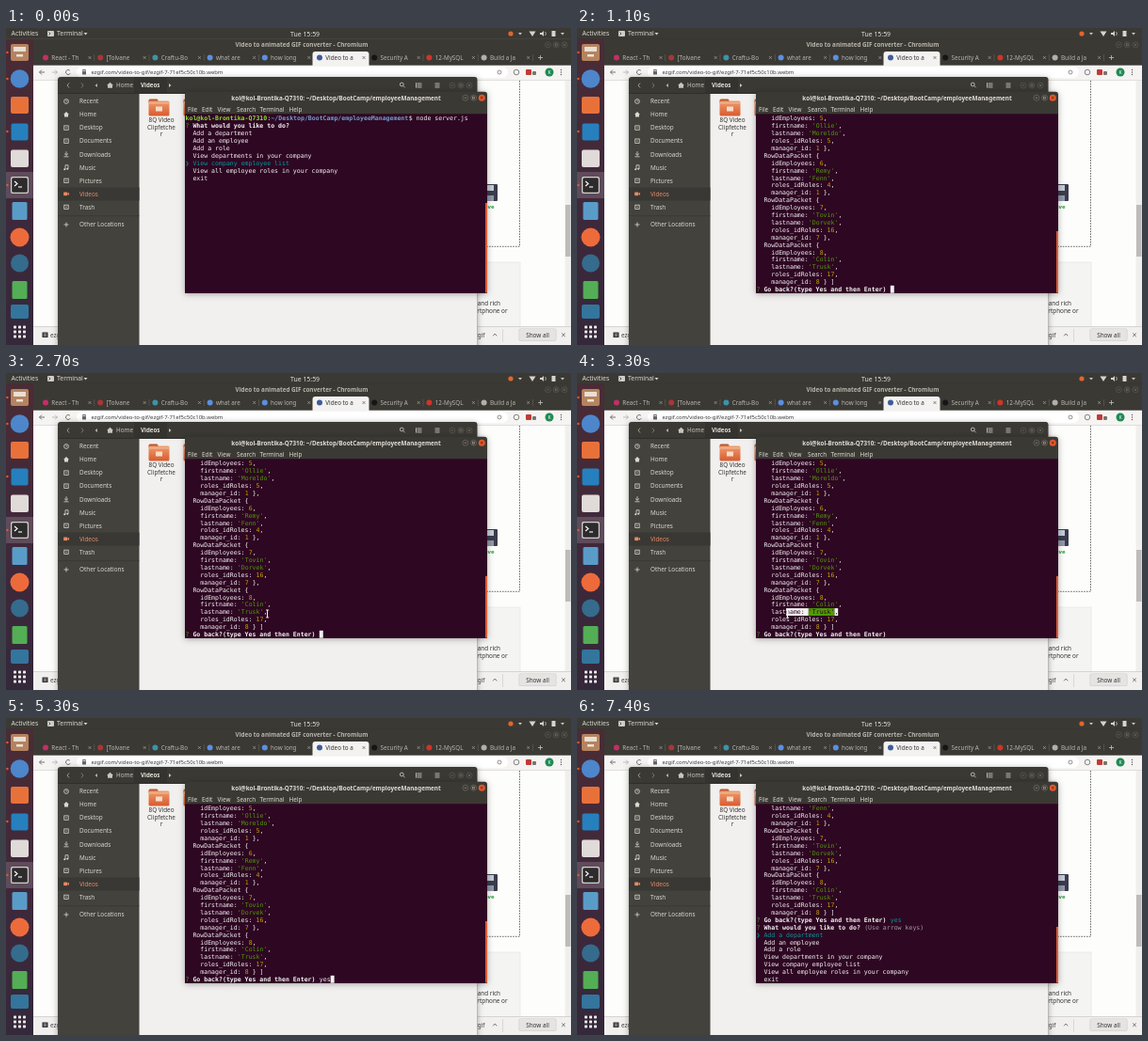
Write an HTML page with a canvas that moves like this. It is 600 px wide and 337 px high and loops after 7.5 s.

```html
<!DOCTYPE html>
<html lang="en">
<head>
<meta charset="utf-8">
<title>Desktop terminal session</title>
<style>
html, body { margin: 0; width: 100%; height: 100%; overflow: hidden; background: #fff; }
canvas { display: block; width: 600px; height: 337px; }
</style>
</head>
<body>
<canvas id="stage" width="600" height="337"></canvas>
<script>
const W = 600, H = 337, LOOP = 7500;
const UI = '"Noto Sans", "Open Sans", sans-serif';
const MONO = '"DejaVu Sans Mono", monospace';
const stage = document.getElementById('stage').getContext('2d');
const desk = document.createElement('canvas');
desk.width = W;
desk.height = H;
let c = desk.getContext('2d');

// ---------- drawing helpers ----------
function rect(x, y, w, h, color) {
  c.fillStyle = color;
  c.fillRect(x, y, w, h);
}
function round(x, y, w, h, r, color) {
  c.fillStyle = color;
  c.beginPath();
  c.roundRect(x, y, w, h, r);
  c.fill();
}
function disc(x, y, r, color) {
  c.fillStyle = color;
  c.beginPath();
  c.arc(x, y, r, 0, Math.PI * 2);
  c.fill();
}
function ring(x, y, r, color, width = 0.8) {
  c.beginPath();
  c.arc(x, y, r, 0, Math.PI * 2);
  c.strokeStyle = color;
  c.lineWidth = width;
  c.stroke();
}
function path(points, color, width = 0.8, closed = false) {
  c.beginPath();
  points.forEach(([x, y], i) => i ? c.lineTo(x, y) : c.moveTo(x, y));
  if (closed) c.closePath();
  c.strokeStyle = color;
  c.lineWidth = width;
  c.stroke();
}
function poly(points, color) {
  c.beginPath();
  points.forEach(([x, y]) => c.lineTo(x, y));
  c.closePath();
  c.fillStyle = color;
  c.fill();
}
function label(str, x, y, color, size = 6.35, weight = 400, align = 'left') {
  c.font = `${weight} ${size}px ${UI}`;
  c.textAlign = align;
  c.fillStyle = color;
  c.fillText(str, x, y);
}
function cross(x, y, r, color, width) {
  path([[x - r, y - r], [x + r, y + r]], color, width);
  path([[x + r, y - r], [x - r, y + r]], color, width);
}
function caret(x, y, color) {
  poly([[x - 2, y - 1], [x + 2, y - 1], [x, y + 1.4]], color);
}
function chevron(x, y, dir, color) {
  path([[x - dir, y - 2.5], [x + dir, y], [x - dir, y + 2.5]], color);
}
function shadow(on) {
  c.shadowColor = on ? 'rgba(0,0,0,.35)' : 'transparent';
  c.shadowBlur = on ? 6 : 0;
  c.shadowOffsetY = on ? 1 : 0;
}
function windowButtons(x, y, step, active) {
  const ink = active ? '#a5a199' : '#75726b';
  for (const i of [1, 2]) ring(x - i * step, y, 3, active ? '#6b6861' : '#57554f');
  if (active) disc(x, y, 3.5, '#e2582c');
  else ring(x, y, 3, '#57554f');
  path([[x - 2 * step - 1.2, y], [x - 2 * step + 1.2, y]], ink, 0.7);
  c.strokeRect(x - step - 1, y - 1, 2, 2);
  cross(x, y, 1.2, active ? '#4a1c0c' : ink, 0.7);
}

// ---------- desktop ----------
const BAR = '#3b3934', PALE = '#d8d4cc';

function panel() {
  rect(0, 0, W, 11.5, BAR);
  label('Activities', 5.5, 8.4, '#dedad3', 6.9);
  round(44, 3, 7, 6, 1, '#d0cdc8');
  path([[45.5, 4.5], [47, 6], [45.5, 7.5]], '#222', 0.7);
  label('Terminal', 54, 8.4, '#dedad3', 6.8);
  caret(84.5, 6, PALE);
  label('Tue 15:59', 317.5, 8.5, '#e6e3de', 6.9, 500, 'center');
  disc(536, 6, 2.6, '#e0662f');
  caret(546, 6, '#c9c6c0');
  poly([[555.5, 3.5], [562.5, 3.5], [559, 9]], PALE);
  poly([[567, 5], [569, 5], [571, 3], [571, 9], [569, 7], [567, 7]], PALE);
  path([[572.5, 4], [573.5, 6], [572.5, 8]], PALE, 0.7);
  rect(579.5, 3, 4, 6, PALE);
  caret(591, 6, '#c9c6c0');
}

function dock() {
  const fade = c.createLinearGradient(0, 11, 0, H);
  fade.addColorStop(0, '#4a2c35');
  fade.addColorStop(0.5, '#3f293b');
  fade.addColorStop(1, '#34283a');
  rect(0, 11.5, 29, H, fade);
  round(5, 17, 19, 18, 2, '#b5835f');
  rect(8, 20, 13, 5, '#e8dfd4');
  rect(11, 28, 7, 2.5, '#eee3d6');
  disc(14.5, 54, 9.8, '#4d86cb');
  round(5, 73, 19, 18, 2, '#e8713a');
  round(5.5, 101.5, 18, 18, 2, '#2680bd');
  round(5, 129.5, 19, 18.5, 2, '#e0dad8');
  rect(0, 153, 29, 28, 'rgba(255,255,255,.16)');
  round(5, 158, 19, 18, 2, '#d4d1cc');
  round(6.2, 159.2, 16.6, 15.6, 1.5, '#2d2b2c');
  path([[9, 163], [12, 165.5], [9, 168]], '#fff', 1.1);
  path([[13, 169], [17, 169]], '#fff', 1.1);
  round(6.5, 185, 16, 19, 1.5, '#5a9cc8');
  disc(14.5, 222.5, 10, '#ed6b3b');
  disc(14.5, 250, 9.5, '#356b8c');
  round(6.5, 269, 16, 19, 1.5, '#53ae55');
  round(5, 294, 19, 15, 2, '#33759c');
  for (let i = 0; i < 9; i++) {
    round(8 + (i % 3) * 5, 316.5 + Math.floor(i / 3) * 5, 3, 3, 0.7, '#eeeaea');
  }
  for (const y of [26, 54, 110, 167]) disc(1.4, y, 1.2, '#e2582c');
}

const TABS = [
  ['React - Th', '#c22f66'], ['[Tolvane', '#a93636'], ['Craftu-Bo', '#3b94a8'],
  ['what are ', '#5b8fe0'], ['how long ', '#5b8fe0'], ['Video to a', '#3d5c9b'],
  ['Security A', '#151515'], ['12-MySQL', '#cf3527'], ['Build a Ja', '#b4b0a8']
];

function browser() {
  rect(29, 11.5, W - 29, 28.5, BAR);
  label('Video to animated GIF converter - Chromium', 314, 20, '#b9b5ac', 6.3, 600, 'center');
  windowButtons(593, 17.8, 8.8, false);
  TABS.forEach(([name, color], i) => {
    const x = 36 + i * 58.2, active = i === 5;
    if (active) round(x - 1.5, 25, 60, 16, [3, 3, 0, 0], '#f3f2f0');
    disc(x + 6, 31.5, 3, color);
    label(name, x + 12.3, 33.7, active ? '#333' : '#b8b5af', 6.3);
    cross(x + 53, 31.5, 1.4, active ? '#555' : '#aaa7a1', 0.7);
    if (!active && i !== 4) rect(x + 57.5, 28, 0.6, 7, '#66635e');
  });
  path([[565, 31.5], [570, 31.5]], '#c5c2bc');
  path([[567.5, 29], [567.5, 34]], '#c5c2bc');

  rect(29, 39.7, W - 29, 16, '#f5f4f2');
  path([[41, 47], [35.5, 47], [38, 44.5]], '#555');
  path([[35.5, 47], [38, 49.5]], '#555');
  path([[49, 47], [54.5, 47], [52, 44.5]], '#aaa');
  path([[54.5, 47], [52, 49.5]], '#aaa');
  c.beginPath();
  c.arc(66, 47, 2.5, 0.4, 5.6);
  c.strokeStyle = '#555';
  c.stroke();
  round(75, 41, 458, 12, 6, '#fff');
  rect(81, 46.3, 4, 3.2, '#666');
  c.strokeRect(81.8, 44.3, 2.4, 2);
  label('ezgif.com/video-to-gif/ezgif-7-71ef5c50c10b.webm', 90.5, 49.3, '#3b3b3b', 5.9);
  ring(524, 47, 2, '#777');
  ring(542, 47, 2.8, '#666');
  round(552, 44, 6, 6, 1, '#c23a34');
  round(559, 46, 4, 4, 1, '#77756f');
  disc(577, 47, 4.5, '#1f8a53');
  label('K', 577, 48.9, '#fff', 5, 400, 'center');
  for (const y of [44.5, 47, 49.5]) disc(589.5, y, 0.7, '#555');

  rect(29, 55.7, W - 29, 262, '#fdfdfc');
  rect(29, 55.4, W - 29, 0.6, '#d2d0cc');
  c.setLineDash([1.6, 1.2]);
  path([[545.5, 56], [545.5, 232.3], [498, 232.3]], '#444', 0.8);
  c.setLineDash([]);
  round(505, 166, 17, 18, 1, '#3a3c4c');
  rect(509, 167, 9, 6, '#c5cbd8');
  rect(509, 178, 9, 6, '#8f96a9');
  label('Save', 518.5, 191.5, '#2b9b3e', 6, 600, 'right');
  rect(480, 249, 66, 68, '#f4f4f3');
  c.strokeStyle = '#e2e2e2';
  c.lineWidth = 0.6;
  c.strokeRect(480, 249, 66, 80);
  label('and rich', 525, 295, '#333', 6.35, 400, 'right');
  label('smartphone or', 532.5, 303, '#333', 6.35, 400, 'right');
  rect(593.5, 56, 6.5, 262, '#f0efee');
  rect(594, 188, 5.5, 55, '#bdbcba');

  rect(29, 317.5, W - 29, 20, '#f1f0ee');
  rect(29, 317, W - 29, 0.7, '#c9c7c3');
  rect(38.5, 323.5, 6, 5.5, '#333');
  rect(40, 324.5, 3, 3.5, '#777');
  label('ezgif', 47, 328.5, '#444');
  label('ezgif', 508.5, 328.5, '#444', 6.35, 400, 'right');
  path([[517.2, 327.3], [519.2, 325], [521.2, 327.3]], '#555');
  rect(527, 320, 0.7, 14, '#cfcdc9');
  round(544.5, 319.5, 40, 13.5, 2, '#cfcdca');
  round(545.1, 320.1, 38.8, 12.3, 1.6, '#e5e4e2');
  label('Show all', 564.5, 328.5, '#333', 6.35, 500, 'center');
  cross(592, 326.3, 1.8, '#555', 0.8);
}

function folder(x, y) {
  round(x, y, 10, 5, 1.5, '#b9572e');
  const body = c.createLinearGradient(0, y, 0, y + 18);
  body.addColorStop(0, '#f0a678');
  body.addColorStop(1, '#d95a2f');
  round(x, y + 2, 22, 16, 1.5, body);
  rect(x, y + 4, 22, 0.8, '#f5cdb0');
  rect(x + 7.5, y + 8, 7, 5, '#f7dcc4');
}

const PLACES = ['Recent', 'Home', 'Desktop', 'Documents', 'Downloads',
  'Music', 'Pictures', 'Videos', 'Trash'];

function placeIcon(i, y, color) {
  c.strokeStyle = color;
  c.lineWidth = 0.8;
  if (i === 0) {
    ring(64, y, 2.4, color);
    path([[64, y - 1.5], [64, y], [65.2, y]], color, 0.6);
  } else if (i === 1) {
    poly([[61, y], [64, y - 3], [67, y], [66, y], [66, y + 2.5], [62, y + 2.5], [62, y]], color);
  } else if (i === 4) {
    path([[64, y - 3], [64, y + 1]], color);
    path([[62, y - 0.7], [64, y + 1.2], [66, y - 0.7]], color);
    path([[61.5, y + 2.6], [66.5, y + 2.6]], color);
  } else if (i === 5) {
    path([[63, y + 2], [63, y - 2.5], [66, y - 2.5], [66, y + 1.5]], color);
    disc(62.2, y + 2, 1, color);
    disc(65.2, y + 1.6, 1, color);
  } else if (i === 7) {
    rect(61.2, y - 1.8, 4, 3.6, color);
    poly([[65, y], [67, y - 1.6], [67, y + 1.6]], color);
  } else {
    c.strokeRect(61.8, y - 2.2, 4.4, 4.4);
    path([[63, y], [65, y]], color, 0.6);
  }
}

function fileManager() {
  shadow(true);
  round(55, 52, 445.5, 300, [3, 3, 0, 0], BAR);
  shadow(false);
  rect(55, 70, 86.5, H, '#43423d');
  rect(141.5, 70, 359, H, '#f1f0ee');
  rect(55, 69.4, 445.5, 0.6, '#282723');
  chevron(66, 61, -1, '#b5b1a9');
  chevron(81, 61, 1, '#8b8880');
  poly([[97, 59], [94.5, 61], [97, 63]], '#b5b1a9');
  poly([[107, 61], [110.5, 57.7], [114, 61], [113, 61], [113, 63.7], [108, 63.7], [108, 61]], '#c9c5bd');
  label('Home', 117, 63.2, '#c9c5bd');
  rect(136, 52.5, 35, 17, '#34332f');
  label('Videos', 143, 63.2, '#e6e2da', 6.2, 600);
  poly([[173, 59], [175.5, 61], [173, 63]], '#c9c5bd');
  ring(420.3, 60, 1.9, PALE);
  path([[421.7, 61.4], [423.6, 63.3]], PALE);
  for (const dy of [-2, 0, 2]) {
    rect(436.5, 60.6 + dy, 5, 0.8, PALE);
    rect(455.5, 60.6 + dy, 5, 0.8, PALE);
  }
  rect(435, 58.2, 0.8, 5.4, PALE);
  windowButtons(492, 61, 9, false);

  rect(55, 169.5, 86.5, 14, '#393834');
  PLACES.forEach((name, i) => {
    const y = 78 + i * 14.05, color = i === 7 ? '#e88a66' : '#dcd8d1';
    placeIcon(i, y, color);
    label(name, 78, y + 2.3, color);
  });
  rect(55, 199.5, 86.5, 0.6, '#35342f');
  path([[61.5, 209], [66.5, 209]], '#dcd8d1');
  path([[64, 206.5], [64, 211.5]], '#dcd8d1');
  label('Other Locations', 78, 211.3, '#dcd8d1');

  folder(151.5, 75.5);
  folder(188.5, 75.5);
  ['8Q Video', 'Clipfetche', 'r'].forEach((s, i) =>
    label(s, 165, 100.2 + i * 7.6, '#333', 6.35, 400, 'center'));
}

function terminalFrame() {
  shadow(true);
  round(190, 67.8, 321, 214, [3, 3, 0, 0], BAR);
  shadow(false);
  label('kol@kol-Brontika-Q7310: ~/Desktop/BootCamp/employeeManagement',
    350.5, 76.5, '#e2ded6', 6.3, 700, 'center');
  windowButtons(505.3, 74.2, 8.7, true);
  rect(190, 80.3, 321, 11, BAR);
  [['File', 193], ['Edit', 208], ['View', 224.5], ['Search', 245],
    ['Terminal', 269.5], ['Help', 300.5]].forEach(([s, x]) => label(s, x, 88.5, '#dedad2'));
  rect(190, 91.3, 321, 190.5, BACK);
}

// ---------- terminal contents ----------
const CELL = 3.953, ROW = 7.9, LEFT = 190.5, BASE = 98.3, MONO_SIZE = CELL / 0.602;
const INK = '#f4f2f3', GREEN = '#4e9a06', GOLD = '#c4a000', CYAN = '#06989a', BACK = '#2e0722';
const span = (str, color = INK, bold = false) => ({ str, color, bold });

const PEOPLE = [
  [5, 'Ollie', 'Moreldo', 5, 1], [6, 'Remy', 'Fenn', 4, 1],
  [7, 'Tovin', 'Dorvek', 16, 7], [8, 'Colin', 'Trusk', 17, 8]
];
const field = (key, value, end = ',') => [
  span(`    ${key}: `),
  typeof value === 'string' ? span(`'${value}'`, GREEN) : span(String(value), GOLD),
  span(end)
];
const LIST = PEOPLE.flatMap(([id, first, last, role, boss], i) => [
  [span('  RowDataPacket {')],
  field('idEmployees', id),
  field('firstname', first),
  field('lastname', last),
  field('roles_idRoles', role),
  field('manager_id', boss, i < PEOPLE.length - 1 ? ' },' : ' } ]')
]);
const ask = (question, ...rest) => [span('? ', GREEN), span(question, INK, true), ...rest];
const goBack = (answer, color) => ask('Go back?(type Yes and then Enter) ', span(answer, color));
const CHOICES = ['Add a department', 'Add an employee', 'Add a role',
  'View departments in your company', 'View company employee list',
  'View all employee roles in your company', 'exit'];
const menu = picked => CHOICES.map((s, i) =>
  i === picked ? [span('❯ ', CYAN, true), span(s, CYAN)] : [span('  ' + s)]);

const START = [
  [span('kol@kol-Brontika-Q7310', '#8ae234', true), span(':'),
    span('~/Desktop/BootCamp/employeeManagement', '#729fcf', true), span('$ node server.js')],
  ask('What would you like to do?'),
  ...menu(4)
];
const AGAIN = [
  ...LIST.slice(9),
  goBack('yes', CYAN),
  ask('What would you like to do? ', span('(Use arrow keys)', '#a79ba3')),
  ...menu(0)
];

const cellX = col => LEFT + col * CELL;

function write(rows) {
  c.textAlign = 'left';
  rows.forEach((spans, r) => {
    let col = 0;
    for (const { str, color, bold } of spans) {
      c.font = `${bold ? 700 : 400} ${MONO_SIZE}px ${MONO}`;
      c.fillStyle = color;
      c.fillText(str, cellX(col), BASE + r * ROW);
      col += str.length;
    }
  });
}

function block(row, col, len, color) {
  rect(cellX(col), BASE + row * ROW - 6.2, len * CELL, ROW, color);
}

// Reverse video for part of one row
function select(spans, row, from, to) {
  let col = 0;
  c.save();
  c.beginPath();
  c.rect(cellX(from), BASE + row * ROW - 6.2, (to - from) * CELL, ROW);
  c.clip();
  for (const { str, color } of spans) {
    block(row, col, str.length, color);
    c.font = `400 ${MONO_SIZE}px ${MONO}`;
    c.fillStyle = BACK;
    c.fillText(str, cellX(col), BASE + row * ROW);
    col += str.length;
  }
  c.restore();
}

// ---------- pointer ----------
const TRACK = [[1500, 300, 276], [1700, 298, 284], [2000, 295, 292], [2200, 288, 309],
  [2500, 280, 264], [2750, 277, 254], [3300, 223.5, 256], [3700, 226, 258],
  [4000, 262, 276], [4200, 296, 270], [4500, 312, 250], [5000, 312, 250]];

function pointerAt(t) {
  const i = TRACK.findIndex(p => p[0] > t);
  if (i < 1) return null;
  const [t0, x0, y0] = TRACK[i - 1], [t1, x1, y1] = TRACK[i];
  const u = (t - t0) / (t1 - t0);
  return [x0 + (x1 - x0) * u, y0 + (y1 - y0) * u];
}

function pointer(x, y) {
  if (y < 282) {
    path([[x, y - 4], [x, y + 4]], '#fff', 1);
    path([[x - 1.6, y - 4], [x + 1.6, y - 4]], '#fff', 0.8);
    path([[x - 1.6, y + 4], [x + 1.6, y + 4]], '#fff', 0.8);
    return;
  }
  const shape = [[0, 0], [0, 8], [1.9, 6.3], [3.2, 9.2], [4.6, 8.5], [3.4, 5.8], [5.8, 5.6]]
    .map(([dx, dy]) => [x + dx, y + dy]);
  poly(shape, '#fff');
  path(shape, '#111', 0.9, true);
}

// ---------- timeline ----------
const BLINK = [900, 1500, 2200, 2800, 3400, 4000, 4500];
const KEYS = [5000, 5100, 5300];
const LIST_AT = 900, MENU_AT = 5800;

function draw(t) {
  c.drawImage(desk, 0, 0);
  let thumb = 186;
  if (t < LIST_AT) {
    write(START);
  } else if (t < MENU_AT) {
    thumb = 216;
    const typed = KEYS.filter(k => t >= k).length;
    const rows = [...LIST.slice(1), goBack('yes'.slice(0, typed))];
    write(rows);
    if (t >= 2750 && t < 3700) {
      const from = Math.round(22 - 14 * Math.min(1, (t - 2750) / 550));
      if (from < 22) select(rows[20], 20, from, 22);
    }
    if (BLINK.filter(b => t >= b).length % 2) block(23, 36 + typed, 1, INK);
    const at = pointerAt(t);
    if (at) pointer(...at);
  } else {
    thumb = 222;
    write(AGAIN);
  }
  rect(509, thumb, 2, 281.5 - thumb, '#df5a30');
}

browser();
dock();
panel();
fileManager();
terminalFrame();
c = stage;

function tick() {
  draw(performance.now() % LOOP);
  requestAnimationFrame(tick);
}
tick();
</script>
</body>
</html>
```
